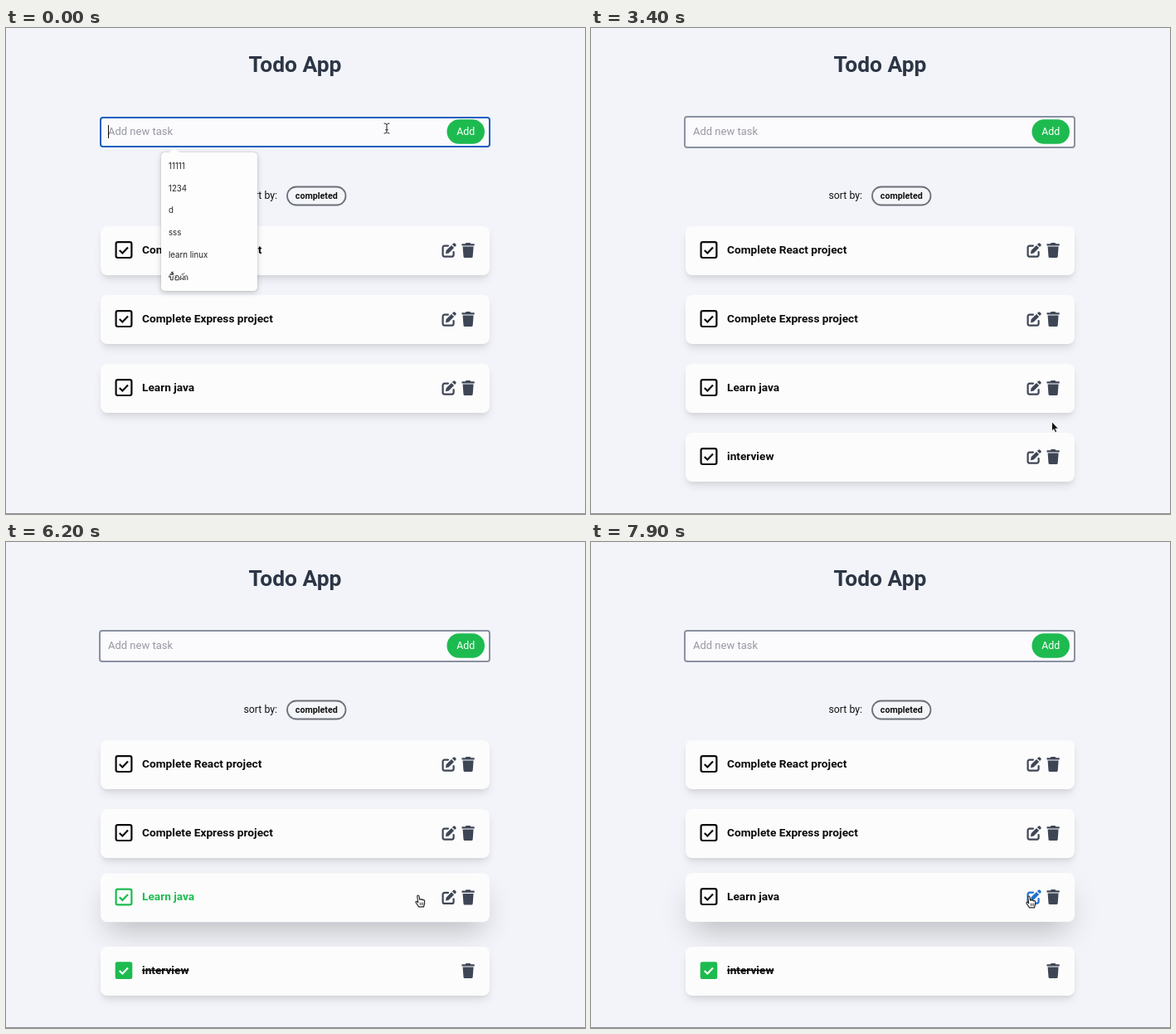
These frames come from a looping animation (698x586 px, 8 s). An HTML page:

```html
<!DOCTYPE html>
<html lang="en">
<head>
<meta charset="utf-8">
<title>Todo App</title>
<style>
  html, body { margin: 0; width: 100%; height: 100%; overflow: hidden; background: #f2f4f9; }
  #stage { position: relative; width: 698px; height: 586px; overflow: hidden; background: #f2f4f9; font-family: Roboto, sans-serif; }
  svg { position: absolute; left: 0; top: 0; overflow: visible; }
  .card { position: absolute; left: 114px; width: 469px; height: 58.5px; border-radius: 8px; background: #fcfcfc; }
  .card text { font-size: 13.7px; font-weight: 700; fill: currentColor; }
  .done text { text-decoration: line-through; }
  .done .open, .card:not(.done) .full, .done .edit { display: none; }
  .field { position: absolute; box-sizing: border-box; left: 112px; top: 106px; width: 472px; height: 39px;
    border: 2px solid #8b90a2; border-radius: 4px; background: #fbfbfd; }
  .field.focus { left: 113px; top: 107px; width: 470.5px; height: 37px; border-color: #1a5fbf; }
  #entry { position: absolute; left: 123px; top: 115px; height: 20px; line-height: 20px; font-size: 12.3px; color: #111; white-space: pre; }
  #caret { position: absolute; left: 100%; top: 2px; width: 1px; height: 16px; background: #111; }
  #hint { position: absolute; left: 123px; top: 115px; line-height: 20px; font-size: 13px; color: #9898a5; }
  #list { position: absolute; left: 187px; top: 150px; width: 116px; height: 167px; border-radius: 4px; background: #fdfdfd;
    box-shadow: 0 0 1px #0007, 0 2px 7px #0003; }
  #list::before { content: ""; position: absolute; left: 10px; top: -5px; border: solid transparent; border-width: 0 6px 5px; border-bottom-color: #fdfdfd; }
  #list text { font: 9.7px Inter, sans-serif; fill: #222; }
</style>
</head>
<body>
<div id="stage">
  <svg width="698" height="586">
    <text x="348.5" y="53" text-anchor="middle" font-size="26.4" font-weight="700" fill="#2d3646">Todo App</text>
    <text x="286.5" y="206" font-size="12.3" fill="#111">sort by:</text>
    <rect x="339" y="191.5" width="70.5" height="22" rx="11" fill="#f3f5f8" stroke="#6c7179" stroke-width="1.8"/>
    <text x="374.3" y="205.7" text-anchor="middle" font-size="10.7" font-weight="700" fill="#111">completed</text>
    <rect y="585" width="698" height="1" fill="#8c8c90"/>
  </svg>
  <div class="field" id="field"></div>
  <div id="hint">Add new task</div>
  <div id="entry"><span id="typed"></span><span id="caret"></span></div>
  <svg width="698" height="586">
    <g id="add">
      <rect x="531.5" y="110.3" width="45.5" height="29.5" rx="14.75" fill="#1dbb4f"/>
      <text x="554.2" y="129" text-anchor="middle" font-size="12.4" fill="#fff">Add</text>
    </g>
  </svg>
  <div id="cards"></div>
  <div id="list">
    <svg id="options" width="116" height="167"></svg>
  </div>
  <svg width="698" height="586">
    <g id="pointer" stroke-linejoin="round" stroke-linecap="round">
      <path class="beam" fill="none" stroke="#222" d="M-3-6q2.6 0 3 1.4q.4-1.4 3-1.4M0-4.6v9.2M-3 6q2.6 0 3-1.4q.4 1.4 3 1.4M-1.3 1.8h2.6"/>
      <path class="arrow" fill="#111" stroke="#fff" stroke-width=".8" d="M-2.5-6v11l2.4-2.2 1.7 3.9 2-.9-1.7-3.7h3.4z"/>
      <g class="hand">
        <path fill="#fff" stroke="#222" stroke-width="1.1" d="M-4.2-5.6c-.2-1.7 1.9-1.8 2.2-.2l.7 4.1c.2-1 1.8-1 2 .2 .3-.9 1.9-.8 2 .4 .4-.7 1.8-.5 1.9.6v3.4c0 1.6-1 2.2-1 4h-6.2c-.6-2-2.6-3.2-3.4-5.3-.4-1.3.9-1.8 1.8-.8l.9 1z"/>
        <path stroke="#222" stroke-width=".8" d="M-.8 2v2.5M1 2v2.5M2.8 2v2.5"/>
      </g>
    </g>
  </svg>
</div>
<script>
const LOOP = 8000, STEP = 100, FADE = 300;
const $ = id => document.getElementById(id);
const clamp = v => Math.max(0, Math.min(1, v));
const ease = p => 1 - (1 - clamp(p)) ** 1.6;
const mix = (a, b, p) => a + (b - a) * p;
const within = (spans, t) => spans.some(([a, b]) => t >= a && t < b);

// Hover spans per task, in ms
const tasks = [
  { name: "Complete React project", hover: [] },
  { name: "Complete Express project", hover: [[6550, 7050], [7400, 7550]] },
  { name: "Learn java", hover: [[4400, 5050], [5950, 6500], [7050, 7350], [7550, 9000]], plain: 7800 },
  { name: "interview", hover: [[3500, 4250], [5100, 5850]], from: 2600, done: 4000 }
];
const WORD = "interview";
const keyTimes = [100, 400, 600, 700, 800, 1000, 1100, 1300, 1500];
const EDIT_AT = 7900;

// Pointer path: time, x, y, shape
const path = [
  [0, 459, 121, "beam"], [200, 459, 121, ""], [1300, 459, 121, "beam"], [1500, 500, 124, "beam"],
  [1700, 590, 132, "arrow"], [1900, 632, 146, "arrow"], [2100, 634, 150, "arrow"], [2200, 605, 138, "arrow"],
  [2300, 566, 127, "hand"], [2400, 561, 126, "hand"], [2800, 561, 126, "hand"], [2900, 598, 190, "arrow"],
  [3000, 622, 310, "arrow"], [3100, 620, 436, "arrow"], [3200, 620, 436, "arrow"], [3300, 588, 464, "arrow"],
  [3400, 558, 481, "arrow"], [3500, 535, 500, "hand"], [3700, 500, 515, "hand"], [4200, 498, 510, "hand"],
  [4300, 490, 477, "arrow"], [4400, 485, 446, "hand"], [4500, 484, 428, "hand"], [4900, 484, 428, "hand"],
  [5000, 486, 448, "hand"], [5100, 490, 492, "hand"], [5300, 498, 515, "hand"], [5600, 498, 515, "hand"],
  [5900, 500, 477, "arrow"], [6000, 500, 447, "hand"], [6200, 500, 433, "hand"], [6400, 500, 424, "hand"],
  [6500, 499, 392, "arrow"], [6600, 498, 370, "hand"], [6800, 497, 360, "hand"], [7000, 497, 368, "hand"],
  [7100, 498, 418, "hand"], [7200, 498, 425, "hand"], [7300, 497, 412, "hand"], [7400, 496, 374, "hand"],
  [7500, 495, 359, "hand"], [7600, 503, 414, "hand"], [7700, 520, 425, "hand"], [7800, 547, 432, "hand"],
  [7900, 531, 434, "hand"]
];

const tick = "M22.8 29l3.6 3.5 6.6-6.9";
$("cards").innerHTML = tasks.map((task, i) => `
  <div class="card" style="top:${239 + 83 * i}px">
    <svg width="469" height="58">
      <g class="open" fill="none" stroke="currentColor" stroke-width="2.2">
        <rect x="18.6" y="19.2" width="18.8" height="18.8" rx="2.2"/><path d="${tick}"/>
      </g>
      <g class="full">
        <rect x="17.7" y="18.3" width="20.6" height="20.6" rx="2.5" fill="#1dbb4f"/>
        <path d="${tick}" fill="none" stroke="#fff" stroke-width="2.2"/>
      </g>
      <text x="50" y="32.8">${task.name}</text>
      <g fill="#3e4656">
        <g class="edit" transform="translate(411 20)">
          <path d="M8 3.6H3.6a2 2 0 0 0-2 2v9a2 2 0 0 0 2 2h9a2 2 0 0 0 2-2V11" fill="none" stroke="#3e4656" stroke-width="2.2" stroke-linecap="round"/>
          <path d="M5.6 9.3 12 2.9l3.1 3.1-6.4 6.4-3.7.8zM12.9 2l1.3-1.3a1.5 1.5 0 0 1 2.1 0l1 1a1.5 1.5 0 0 1 0 2.1L16 5.1z"/>
        </g>
        <path transform="translate(435.2 20)" d="M.3 1.2h4.3L5.4 0h5l.8 1.2h4.3v2.3H.3zM1.4 4.6h13l-.9 12a1.6 1.6 0 0 1-1.6 1.5H3.9a1.6 1.6 0 0 1-1.6-1.5z"/>
      </g>
    </svg>
  </div>`).join("");

// The last suggestion is Thai, drawn as strokes since no installed font covers it
$("options").innerHTML = ["11111", "1234", "d", "sss", "learn linux"]
  .map((s, i) => `<text x="9" y="${(20 + 26.7 * i).toFixed(1)}">${s}</text>`).join("") + `
  <path aria-label="ซื้อผัก" transform="translate(9 154)" fill="none" stroke="#222" stroke-width=".9"
    d="M1.6-3.6a.8.8 0 1 1 0-1.4l1 .4v4.4h2.6v-4l1-1.2M1.6-6.8q2-2 4 0zM4.4-8v-1.2M5.6-7v-2.2M3-10l.8 1 1.6-1.4
    M8.2-3a.8.8 0 1 0-.2-.6v3.4h4v-3.8q-.4-1.8-2.2-1.6-1.4 0-1.8 1
    M14-5a.7.7 0 1 1 0 1.2v3.6l2-2.2 2 2.2v-5.2M15.6-7q2 1 3.4-1.6
    M20 0v-3.2l-.8-.8q2-2.6 3.6-.4v4.4"/>`;

const cards = [...document.querySelectorAll(".card")];
const shapes = [...$("pointer").children];
const edit = cards[2].querySelector(".edit");
const editLine = edit.querySelector("path");

function drawCard(card, task, t) {
  const p = task.hover.reduce((sum, [a, b]) => sum + ease((t - a) / FADE) - ease((t - b) / FADE), 0);
  const green = within(task.hover, t) && !(t >= task.plain);
  card.style.display = t < (task.from || 0) ? "none" : "";
  card.style.color = !green ? "#0b0b0b" : "#1dbb4f";
  card.style.transform = `translateY(${mix(0, -6, p)}px)`;
  card.style.boxShadow =
    `0 ${mix(7, 18, p)}px ${mix(11, 36, p)}px ${mix(-2, -9, p)}px rgba(0,0,0,${mix(.1, .25, p)}),` +
    `0 3px 4px -1px rgba(0,0,0,${mix(.05, 0, p)})`;
  card.classList.toggle("done", t >= task.done);
}

function drawPointer(t) {
  let i = path.length - 1;
  while (path[i][0] > t) i--;
  const a = path[i], b = path[i + 1] || a;
  const p = b === a ? 0 : (t - a[0]) / (b[0] - a[0]);
  $("pointer").setAttribute("transform", `translate(${mix(a[1], b[1], p)} ${mix(a[2], b[2], p)})`);
  shapes.forEach(s => s.style.display = s.classList.contains(a[3]) ? "" : "none");
}

function draw(t) {
  const sent = t >= 2500;
  const typed = sent ? "" : WORD.slice(0, keyTimes.filter(k => k <= t).length);
  $("typed").textContent = typed;
  $("hint").style.display = typed ? "none" : "";
  $("caret").style.display = sent ? "none" : "";
  $("field").classList.toggle("focus", !sent);
  $("add").style.opacity = within([[2300, 2850]], t) ? .6 : 1;
  $("list").style.opacity = t < 100 ? 1 : clamp((250 - t) / 250);
  tasks.forEach((task, i) => drawCard(cards[i], task, t));
  const ink = t >= EDIT_AT ? "#1f6fd0" : "#3e4656";
  edit.style.fill = editLine.style.stroke = ink;
  drawPointer(t);
}

const start = performance.now();
function loop() {
  const t = (performance.now() - start) % LOOP;
  draw(Math.floor(t / STEP) * STEP);
  requestAnimationFrame(loop);
}
loop();
</script>
</body>
</html>
```
